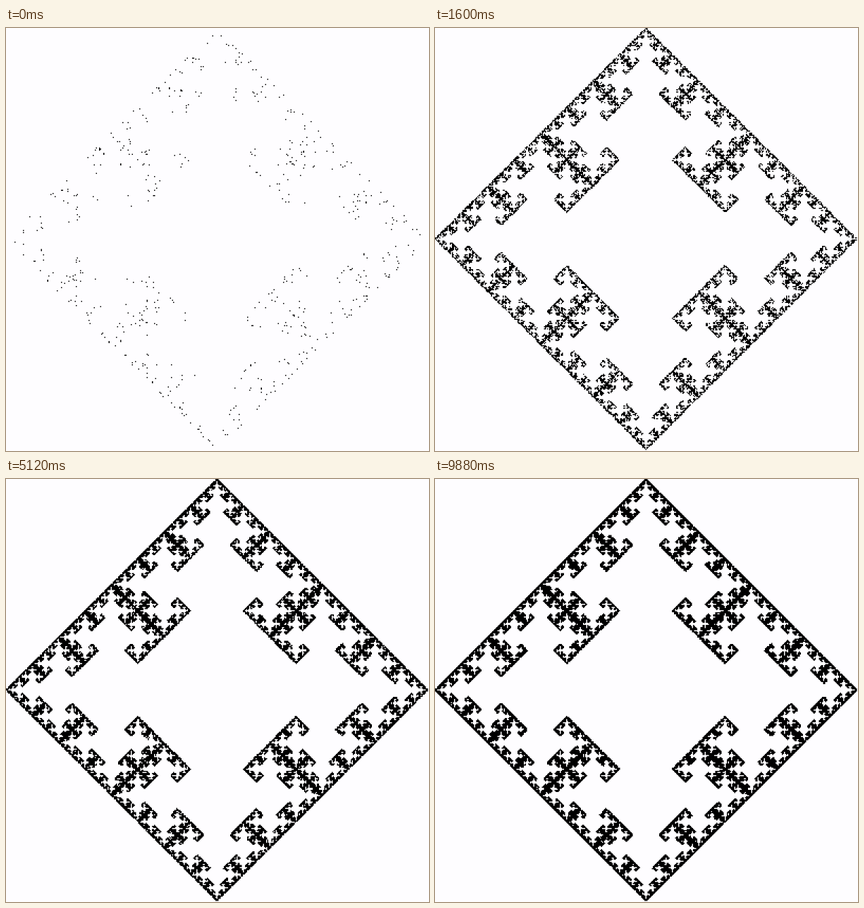
These frames come from a looping animation (600x600 px, 9.92 s). An HTML page with a canvas:

```html
<!DOCTYPE html>
<html lang="en">
<head>
<meta charset="utf-8">
<title>Chaos game in a square</title>
<style>
  html, body { margin: 0; width: 100%; height: 100%; overflow: hidden; background: #fefdff; }
  canvas { display: block; width: 600px; height: 600px; }
</style>
</head>
<body>
<canvas id="stage" width="1200" height="1200"></canvas>
<script>
// A 400 x 400 grid of 3 px cells, shown at half size so every dot is a soft 1.5 px.
const ctx = document.getElementById('stage').getContext('2d');
const CELL = 3, SIZE = 1200;
const STEP = 40, STEPS = 248, PER_STEP = 600;
const SPAN = 399, MID = SPAN / 2;
const corners = [[MID, 0], [SPAN, MID], [MID, SPAN], [0, MID]];

let seed, x, y, corner, drawn;

function random() {
  seed = (seed + 0x6D2B79F5) | 0;
  let t = Math.imul(seed ^ (seed >>> 15), 1 | seed);
  t = (t + Math.imul(t ^ (t >>> 7), 61 | t)) ^ t;
  return ((t ^ (t >>> 14)) >>> 0) / 4294967296;
}

function reset() {
  seed = 2024;
  [x, y] = corners[3];
  corner = 3;
  drawn = 0;
  ctx.fillStyle = '#fefdff';
  ctx.fillRect(0, 0, SIZE, SIZE);
  ctx.fillStyle = '#000';
}

// Jump halfway to any corner except the one opposite the last.
function jump() {
  corner = (corner + 3 + Math.floor(random() * 3)) % 4;
  x = (x + corners[corner][0]) / 2;
  y = (y + corners[corner][1]) / 2;
  ctx.fillRect(Math.floor(x) * CELL, Math.floor(y) * CELL, CELL, CELL);
}

function draw() {
  const step = Math.floor(performance.now() / STEP) % STEPS;
  const goal = (step + 1) * PER_STEP;
  if (goal < drawn) reset();
  for (; drawn < goal; drawn++) jump();
  requestAnimationFrame(draw);
}

reset();
draw();
</script>
</body>
</html>
```
